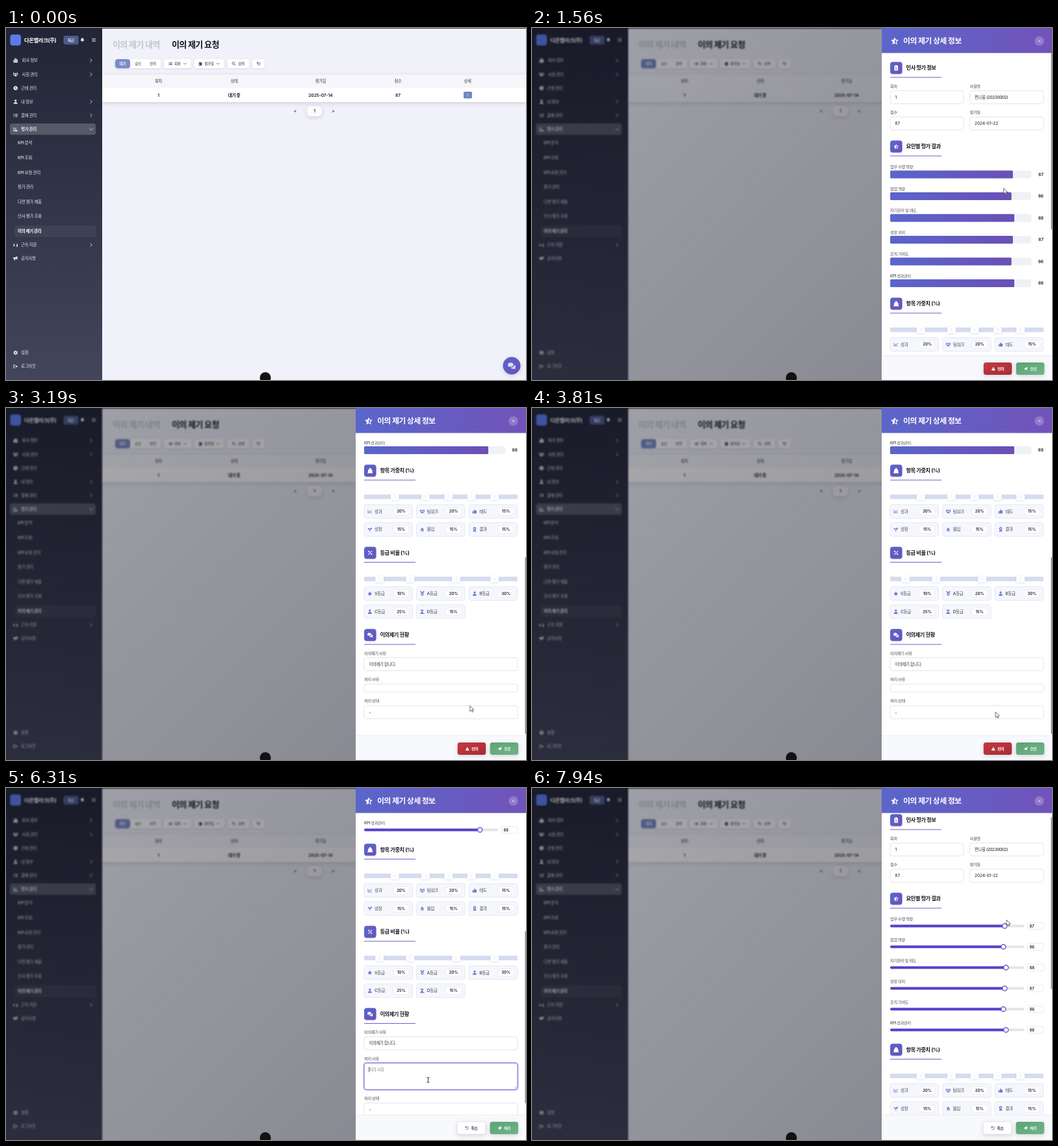
Write an HTML page that moves like this. It is 800x542 px and loops after 8 s.

```html
<!DOCTYPE html>
<html lang="ko">
<head>
<meta charset="utf-8">
<title>이의 제기 관리</title>
<style>
  html, body { margin: 0; height: 100%; overflow: hidden; background: #f1f1f9; }
  svg, #shade { position: fixed; inset: 0; width: 100%; height: 100%; }
  text { font-family: Inter, "Noto Sans CJK KR", "Noto Sans CJK", sans-serif; white-space: pre; }
  .ko { letter-spacing: -.05em; }
  .line { fill: none; stroke: currentColor; stroke-width: 1.8; stroke-linecap: round; stroke-linejoin: round; }
  .soft { filter: drop-shadow(0 1px 1.5px rgba(40, 40, 90, .13)); }
  .lift { filter: drop-shadow(0 2px 3px rgba(40, 40, 90, .16)); }
  #shade {
    background: linear-gradient(135deg, rgba(10, 10, 20, .34), rgba(10, 10, 20, .47));
    backdrop-filter: blur(1.3px);
  }
</style>
</head>
<body>
<svg id="page" viewBox="0 0 800 542"></svg>
<div id="shade"></div>
<svg id="front" viewBox="0 0 800 542"></svg>
<script>
const $ = id => document.getElementById(id);

// Icons live on a 16 x 16 grid; a leading "~" marks a stroked icon.
const person = 'M8 1a3.5 3.5 0 1 0 .01 0zM1.5 15c0-8 13-8 13 0z';
const star = 'M8 1l2.2 4.6 5 .7-3.6 3.5.9 5L8 12.4l-4.5 2.4.9-5L.8 6.3l5-.7z';
const icons = {
  city: 'M1 15V6h4V1h6v4h4v10zM7 3h2v2H7zM7 7h2v2H7zM11 8h2v2h-2zM3 9h2v2H3z',
  users: 'M8 3a2.5 2.5 0 1 0 .01 0zM3.5 14c0-7 9-7 9 0zM2.5 2a2 2 0 1 0 .01 0zM13.5 2a2 2 0 1 0 .01 0zM0 10c0-4 3-4 4.5-2.5L2.5 10zM16 10c0-4-3-4-4.500-2.500l2 2.500z',
  clock: 'M8 1a7 7 0 1 0 .01 0zM7.200 4h1.600v4l2.600 2-1 1.200-3.200-2.400z',
  person,
  personOff: person + 'M0 2l1.200-1.200L16 14l-1.200 1.200z',
  list: 'M6 2.500h9v2H6zM6 7h9v2H6zM6 11.500h9v2H6zM1 2.500h3v2H1zM1 7h3v2H1zM1 11.500h3v2H1z',
  bars: 'M1 1h2v12h12v2H1zM5 3h7v2H5zM5 6.500h4v2H5zM5 10h9v2H5z',
  headset: 'M1 9a7 7 0 0 1 14 0v5h-5v-2h3v-1h-2V7h2a5 5 0 0 0-10 0h2v5H1z',
  horn: 'M14 1v12l-6-3H6l1 5H4l-1-5H1V5h7z',
  gear: 'M6.500 1h3l.4 2 1.600.9 2-.7 1.500 2.600-1.600 1.400v1.600l1.600 1.400-1.500 2.600-2-.7-1.600.9-.4 2h-3l-.4-2-1.600-.9-2 .7L1 10.200l1.600-1.400V7.200L1 5.800l1.500-2.600 2 .7 1.600-.9zM8 5.700a2.300 2.300 0 1 0 .01 0z',
  exit: 'M1 2h6v2H3v8h4v2H1zM6 7h4V4l5 4-5 4V9H6z',
  bell: 'M8 1c5 0 4 5 6 10H2C4 6 3 1 8 1zM6 12.500h4a2 2 0 0 1-4 0z',
  star,
  halfStar: star + 'M8 4.200v6.900l2.600 1.400-.5-3 2.100-2-2.900-.5z',
  weight: 'M8 1a3 3 0 0 1 2.600 4H13l2 10H1L3 5h2.400A3 3 0 0 1 8 1z',
  comments: 'M6 2c7 0 7 8 0 8-1 0-2-.2-2.600-.5L1 10.500 1.600 8C-.8 5 2 2 6 2zM12.500 6c3 1 3.500 4 2 6l.5 2.500-2.600-.8c-3 .8-5.400-.2-6.400-2.200 4.500 0 7-2.500 6.500-5.500z',
  clipboard: 'M3 2h2.500a2.500 2 0 0 1 5 0H13v13H3zM5.500 7h5v1.500h-5zM5.500 10.500h5V12h-5z',
  trend: 'M1 2h1.600v10.400H15V14H1zM3.500 10l3-4 3 2 4-5 1.200 1-5 6.200-3-2-2.200 2.800z',
  thumb: 'M1 7h3v8H1zM5 7l3-6c2 0 2 2 1.200 5H15l-1.500 9H7l-2-1z',
  sprout: 'M7 15V9C3 9 1 6 1 3c4 0 6 2 7 5 0-4 3-6 7-6 0 4-2 7-6 7v6z',
  fire: 'M7 1c1 3 6 5 6 9a5 5 0 0 1-10 0c0-3 3-5 4-9zM8 8c-1 1.500-2 2-2 3.500a2 2 0 0 0 4 0C10 10 9 9.500 8 8z',
  award: 'M8 0a5 5 0 1 0 .01 0zM8 3a2 2 0 1 1-.01 0zM4.500 9.500L3 16l5-2 5 2-1.500-6.500L8 11z',
  medal: 'M1 0h4l3 5 3-5h4l-4 7a4.500 4.500 0 1 1-6 0zM8 8a2 2 0 1 0 .01 0z',
  plane: 'M15 1L1 8l4 2v5l3-3.500 4 2z',
  warning: 'M8 1l7.500 14H.5zM7.200 6h1.600v4.500H7.200z',
  calendar: 'M2 3h2V1h2v2h4V1h2v2h2v12H2zM4 7v5h4V7z',
  percent: '~M12.500 3.500l-9 9M4.500 3.300a1.200 1.200 0 1 0 .01 0zM11.500 10.300a1.200 1.200 0 1 0 .01 0z',
  undo: '~M3 2v4h4M3.300 6a5.500 5.500 0 1 1 .2 5',
  search: '~M6.500 2a4.500 4.500 0 1 0 .01 0zM10 10l4 4',
  right: '~M5 2l6 6-6 6',
  down: '~M2 5l6 6 6-6',
  close: '~M3 3l10 10M13 3L3 13',
  menu: '~M2 3h12M2 8h12M2 13h12'
};

const rect = (x, y, w, h, r, fill, extra = '') =>
  `<rect x="${x}" y="${y}" width="${w}" height="${h}" rx="${r}" fill="${fill}" ${extra}/>`;
const circle = (x, y, r, fill, extra = '') => `<circle cx="${x}" cy="${y}" r="${r}" fill="${fill}" ${extra}/>`;
const icon = (name, x, y, size, color) => {
  const d = icons[name], stroked = d[0] === '~', k = size / 16;
  return `<path transform="translate(${x - size / 2} ${y - size / 2}) scale(${k})" d="${d.replace('~', '')}"
    color="${color}" fill="${color}" fill-rule="evenodd" class="${stroked ? 'line' : ''}"/>`;
};
// y is the optical middle of the text
const text = (x, y, s, size, color, weight = 500, anchor = 'start') =>
  `<text x="${x}" y="${y + size * .36}" font-size="${size}" fill="${color}" font-weight="${weight}"
    text-anchor="${anchor}" class="${/[가-힣]/.test(s) ? 'ko' : ''}">${s.replace('<', '&lt;')}</text>`;
const mid = (x, y, s, size, color, weight) => text(x, y, s, size, color, weight, 'middle');
const gradient = (id, from, to, dir) =>
  `<linearGradient id="${id}" x2="${dir[0]}" y2="${dir[1]}"><stop stop-color="${from}"/><stop offset="1" stop-color="${to}"/></linearGradient>`;

function sidebar() {
  const ink = '#e4e6ee';
  const menu = [
    [50, 'city', '회사 정보', 'right'], [71.5, 'users', '사원 관리', 'right'], [92.5, 'clock', '근태 관리'],
    [113.5, 'person', '내 정보', 'right'], [134.5, 'list', '결재 관리', 'right'], [156, 'bars', '평가 관리', 'down'],
    [334, 'headset', '근속 지원', 'right'], [354.5, 'horn', '공지사항'], [500, 'gear', '설정'], [521, 'exit', '로그아웃']
  ];
  const sub = ['KPI 분석', 'KPI 조회', 'KPI 요청 관리', '평가 관리', '다면 평가 제출', '인사 평가 조회', '이의 제기 관리'];
  return rect(0, 0, 148, 542, 0, 'url(#side)')
    + rect(6.5, 10, 16.5, 17, 4, '#5b7bea')
    + text(28, 18.5, '다온벨라크(주)', 8.4, '#fff', 700)
    + rect(88.500, 12, 23, 13.5, 3, '#4d5c8c') + mid(100, 18.7, '퇴근', 5.4, '#fff', 600)
    + icon('bell', 117.5, 18.5, 7, '#fff') + icon('menu', 135, 18.5, 6.5, '#fff')
    + rect(6, 147, 132, 17.5, 3, '#555968') + rect(13, 304, 125, 18, 3, '#3f4254')
    + menu.map(([y, name, label, chevron]) =>
        icon(name, 14.7, y, 7.5, ink) + text(name === 'city' || name === 'users' ? 24.5 : 23, y, label, 6.5, ink, chevron === 'down' ? 700 : 500)
        + (chevron ? icon(chevron, 131, y, 6.5, '#fff') : '')).join('')
    + sub.map((label, i) => text(18, 177 + i * 22.6, label, 6.5, i === 6 ? '#fff' : ink, i === 6 ? 700 : 500)).join('');
}

function list() {
  const ink = '#2a2c36', columns = [234.5, 351, 484, 603, 710];
  const pill = (x, w) => rect(x, 48, w, 14, 3, '#fff', 'class="soft"');
  return text(164, 25, '이의 제기 내역', 13, '#c5c5cc', 700) + text(255, 25, '이의 제기 요청', 13, '#15161c', 700)
    + pill(168, 70) + rect(168, 48, 23, 14, 4, '#7a8cc6')
    + mid(179.5, 55, '대기', 5.4, '#fff', 600) + mid(203, 55, '승인', 5.4, ink) + mid(226, 55, '반려', 5.4, ink)
    + pill(243, 42) + icon('list', 253, 55, 6, ink) + text(259, 55, '회차', 5.6, ink) + icon('down', 275.5, 55, 5.5, ink)
    + pill(290, 45.5) + icon('calendar', 299, 55, 6, ink) + text(305, 55, '평가일', 5.6, ink) + icon('down', 326, 55, 5.5, ink)
    + pill(341, 33) + icon('search', 350.5, 55, 6.5, ink) + text(357, 55, '검색', 5.6, ink)
    + pill(379, 19) + icon('undo', 388.5, 55, 6, ink)
    + `<g class="lift">${rect(148, 72, 652, 42, 0, '#fff')}</g>` + rect(148, 72, 652, 20, 0, '#f6f6fa')
    + '<rect id="row" x="148" y="92" width="652" height="22"/>'
    + ['회차', '상태', '평가일', '점수', '상세'].map((s, i) => mid(columns[i], 82, s, 6.4, '#3c3e48')).join('')
    + ['1', '대기 중', '2025-07-14', '87'].map((s, i) => mid(columns[i], 103.3, s, 6.5, '#15161c', 600)).join('')
    + '<rect id="detail" x="704" y="98" width="13" height="10.500" rx="2"/>' + icon('right', 710.5, 103.2, 5, '#fff')
    + mid(445, 128, '<', 6.5, ink, 600) + mid(503.5, 128, '>', 6.5, ink, 600)
    + rect(463, 120, 23, 16, 6, '#fbfbfe', 'class="lift"') + mid(474.5, 128, '1', 6.5, ink, 600)
    + circle(778, 520, 13.5, 'url(#accent)', 'class="lift"') + icon('comments', 778, 520, 13, '#dcdcfa')
    + rect(148, 0, 652, 1, 0, '#3a3b42');
}

const field = (x, y, w, value = '', h = 20) =>
  rect(x, y - h / 2, w, h, 3.5, '#fff', 'stroke="#dcdee8" stroke-width=".8"') + text(x + 7.5, y, value, 6.3, '#33353f');
const label = (x, y, s) => text(x, y, s, 6.2, '#454752');
const section = (y, name, title) =>
  rect(551, y - 9.3, 18.500, 18.500, 4, 'url(#accent)', 'class="soft"') + icon(name, 560.2, y, 9, '#fff')
  + text(575.5, y, title, 8.2, '#17181f', 700) + rect(551, y + 14, 79, 1, 0, '#6a62cc');

function shares(y, parts) {
  let total = 0;
  const handles = parts.slice(0, -1).map(([, , share]) => {
    const x = 551 + 2.36 * (total += share);
    return rect(x - 6.5, y + 34.5, 13, 11, 2, '#fdfdff', 'class="soft"') + rect(x - .3, y + 38, .6, 4, 0, '#dcdfea');
  }).join('');
  const chips = parts.map(([name, title, share], i) => {
    const x = 551 + i % 3 * 80.6, cy = y + 62.8 + Math.floor(i / 3) * 27.8;
    return rect(x, cy - 10.5, 74.5, 21, 3.5, '#f6f7fc', 'stroke="#dfe3f1" stroke-width=".8"')
      + icon(name, x + 8.8, cy, 7.5, '#6a74cf') + text(x + 16, cy, title, 6.6, '#454752')
      + rect(x + 44.5, cy - 6, 25, 12, 6, '#fff', 'stroke="#e3e5ef" stroke-width=".7"')
      + mid(x + 57, cy, share + '%', 6, '#1c1d25', 600);
  }).join('');
  return rect(551, y + 36.7, 236, 7, 1, '#d5dcf0') + handles + chips;
}

const scores = [['업무 수행 역량', 87], ['협업 역량', 86], ['자기관리 및 태도', 88], ['성장 의지', 87], ['조직 기여도', 86], ['KPI 성과관리', 88]];

function details(edit) {
  const first = edit ? 213.5 : 214, step = edit ? 32 : 33.5;
  const weights = first + 5 * step + (edit ? 41.5 : 43), grades = weights + 126.5, appeal = grades + 126.5;
  const rows = scores.map(([title, score], i) => {
    const y = first + i * step, bar = y + (edit ? 11 : 11.5), knob = 555 + 1.98 * score;
    return label(551, y, title) + (edit
      ? rect(551, bar - 2, 206, 4, 2, '#e3e3e8') + rect(551, bar - 2, knob - 551, 4, 2, '#5540cc')
        + circle(knob, bar, 3.6, '#fff', 'stroke="#5540cc" stroke-width="1.2"')
        + rect(762, bar - 5.2, 25, 10.500, 2, '#fff', 'stroke="#e0e2ea" stroke-width=".7"') + text(765.5, bar, '' + score, 5.8, '#1c1d25', 600)
      : rect(551, bar - 6, 217, 12, 2.5, '#f0f1f6') + rect(551, bar - 6, 2.17 * score, 12, 1.5, 'url(#bar)')
        + text(787, bar, '' + score, 6.6, '#1c1d25', 600, 'end'));
  }).join('');
  const reason = edit
    ? rect(551, appeal + 75.5, 236, 41, 3.5, '#fff', 'stroke="#dcdee8" stroke-width=".8"')
      + `<rect id="focus" x="551" y="${appeal + 75.5}" width="236" height="41" rx="3.500" fill="#fff" stroke="#7069d6" style="filter:drop-shadow(0 0 1.500px #8f8ae8)"/>`
      + text(558.5, appeal + 85.5, '처리 사유', 6.3, '#85868f')
      + `<rect id="caret" x="558" y="${appeal + 81.5}" width=".7" height="8" fill="#222"/>`
      + `<path d="M782 ${appeal + 115}l3.500-3.500M784 ${appeal + 115}l1.500-1.500" stroke="#777" stroke-width=".6"/>`
    : field(551, appeal + 81.7, 236, '', 12);
  return section(61.5, 'clipboard', '인사 평가 정보')
    + label(551, 89.5, '회차') + field(551, 106.7, 113, '1')
    + label(673.5, 89.5, '사원명') + field(673.5, 106.7, 113.5, '편나율 (20230002)')
    + label(551, 130, '점수') + field(551, 147, 113, '87')
    + label(673.5, 130, '평가일') + field(673.5, 147, 113.5, '2024-01-22')
    + section(182.5, 'halfStar', '요인별 평가 결과') + rows
    + section(weights, 'weight', '항목 가중치 (%)')
    + shares(weights, [['trend', '성과', 20], ['users', '팀워크', 20], ['thumb', '태도', 15], ['sprout', '성장', 15], ['fire', '몰입', 15], ['award', '결과', 15]])
    + section(grades, 'percent', '등급 비율 (%)')
    + shares(grades, [['star', 'S등급', 10], ['medal', 'A등급', 20], ['person', 'B등급', 30], ['person', 'C등급', 25], ['personOff', 'D등급', 15]])
    + section(appeal, 'comments', '이의제기 현황')
    + label(551, appeal + 28, '이의제기 사유') + field(551, appeal + 45, 236, '이의제기 합니다.')
    + label(551, appeal + 68.5, '처리 사유') + reason
    + label(551, appeal + (edit ? 130 : 101.7), '처리 상태') + field(551, appeal + (edit ? 147 : 119), 236, '-');
}

function footer(edit) {
  const top = edit ? 503 : 504, y = top + 20.5;
  const button = (x, fill, name, title, color, extra = '') =>
    rect(x, y - 9.5, 43.500, 19, 3.500, fill, 'class="lift" ' + extra) + icon(name, x + 15, y, 6.5, color) + text(x + 21.5, y, title, 5.8, color, 600);
  return rect(538, top, 262, 542 - top, 0, '#f8f9fc') + rect(538, top, 262, .7, 0, '#e6e8f0')
    + (edit
      ? button(694, '#fff', 'undo', '취소', '#454752', 'stroke="#dfe1ea" stroke-width=".7"') + button(744.5, 'url(#green)', 'plane', '처리', '#fff')
      : button(694.7, 'url(#red)', 'warning', '반려', '#fff') + button(744.7, 'url(#green)', 'plane', '승인', '#fff'));
}

const mode = (id, edit) => `<g id="${id}"><g clip-path="url(#body)"><g class="scroll">${details(edit)}</g></g>${footer(edit)}</g>`;
const pointers = {
  arrow: '<path d="M0 0v8.500l2-1.800 1.400 3 1.500-.7-1.400-2.900h2.700z" fill="#fff" stroke="#333" stroke-width=".7"/>',
  hand: '<path d="M0 0c1-.8 1.600 0 1.600.8v3.200l3.600.9c1 .3 1 1.200.8 2l-.8 4H.6L-2.400 7c-.4-1 .6-1.500 1.300-.8l.9.900V.8z" fill="#fff" stroke="#333" stroke-width=".7"/>',
  beam: '<path d="M-2-4q2 0 2 1.500q0-1.500 2-1.500M0-3v6M-2 4q2 0 2-1.500q0 1.500 2 1.500" fill="none" stroke="#222" stroke-width=".9"/>'
};

$('page').innerHTML = `<defs>${gradient('side', '#222536', '#43465a', [0, 1])}${gradient('accent', '#5a66cb', '#6852ba', [1, 1])}</defs>`
  + rect(148, 0, 652, 542, 0, '#f1f1f9') + list() + sidebar();
$('front').innerHTML = `<defs>${gradient('head', '#5a66cb', '#7253b9', [1, 0])}${gradient('bar', '#5a66cb', '#6b4fb6', [1, 0])}
  ${gradient('red', '#c23a41', '#a92a35', [1, 1])}${gradient('green', '#5ba375', '#70b488', [1, 1])}
  <clipPath id="body"><rect x="538" y="38" width="262" height="466"/></clipPath></defs>
  ${circle(399, 538.5, 8.5, '#121214')}
  <g id="panel">${rect(538, 0, 262, 542, 0, '#fff')}${mode('view', false)}${mode('edit', true)}
    ${rect(538, 0, 262, 38.5, 0, 'url(#head)')}${icon('halfStar', 558, 20, 13, '#fff')}
    ${text(571, 20, '이의 제기 상세 정보', 11.9, '#fff', 700)}
    ${circle(780.5, 20, 7.3, '#fff', 'fill-opacity=".22"')}${icon('close', 780.5, 20, 5.5, '#fff')}
    <rect id="thumb" x="798.500" width="1.500" rx=".7" fill="#8a8a90"/></g>
  <g id="pointer">${Object.entries(pointers).map(([id, shape]) => `<g id="${id}">${shape}</g>`).join('')}</g>`;

const LOOP = 8000, OPEN = 1300, EDIT = 4420, FOCUS = 5000;
const scrollKeys = [[1600, 0], [1880, 256.5], [2200, 328], [EDIT - 1, 328], [EDIT, 320], [6400, 320], [7000, 145.5], [7450, 12]];
const pointerKeys = [
  [850, 760, -14], [1150, 709, 100], [1330, 709, 100], [1650, 729.5, 281], [2500, 729.5, 281], [3300, 713, 468],
  [3850, 713, 468], [4250, 766, 523], [4500, 766, 523], [4950, 654, 445], [6150, 654, 445], [6350, 649, 450], [7450, 649, 450], [7850, 730, 203]
];

function track(keys, t) {
  const next = keys.findIndex(k => k[0] > t);
  if (next < 0) return keys.at(-1).slice(1);
  if (next === 0) return keys[0].slice(1);
  const a = keys[next - 1], b = keys[next], p = (t - a[0]) / (b[0] - a[0]), e = p * p * (3 - 2 * p);
  return a.slice(1).map((v, i) => v + (b[i + 1] - v) * e);
}
const between = (t, a, b) => t >= a && t < b;
const show = (id, on) => { $(id).style.display = on ? '' : 'none'; };

function draw(t) {
  const opened = 1 - (1 - Math.min(1, Math.max(0, (t - OPEN) / 280))) ** 3;
  const [scroll] = track(scrollKeys, t), [x, y] = track(pointerKeys, t);
  const editing = t >= EDIT, content = editing ? 816 : 795, hover = between(t, 1110, 1600);

  $('row').setAttribute('fill', hover ? '#f5f5fb' : '#fff');
  $('detail').setAttribute('fill', hover ? '#53649f' : '#7187c2');
  $('shade').style.opacity = opened;
  show('shade', opened > 0);
  show('panel', opened > 0);
  $('panel').setAttribute('transform', `translate(${262 * (1 - opened)} 0)`);
  show('view', !editing);
  show('edit', editing);
  document.querySelectorAll('.scroll').forEach(g => g.setAttribute('transform', `translate(0 ${-scroll})`));
  $('thumb').setAttribute('y', 38 + scroll * 465 / content);
  $('thumb').setAttribute('height', 465 * 465 / content);
  show('focus', t >= FOCUS);
  show('caret', t >= FOCUS && (t - FOCUS) % 1000 < 500);

  const hand = hover && t < 1420 || between(t, 4180, 4600), beam = between(t, 4850, 6400);
  show('pointer', t > 850);
  $('pointer').setAttribute('transform', `translate(${x} ${y})`);
  show('hand', hand);
  show('beam', beam);
  show('arrow', !hand && !beam);
}

const start = performance.now();
(function tick() {
  draw((performance.now() - start) % LOOP);
  requestAnimationFrame(tick);
})();
</script>
</body>
</html>
```
